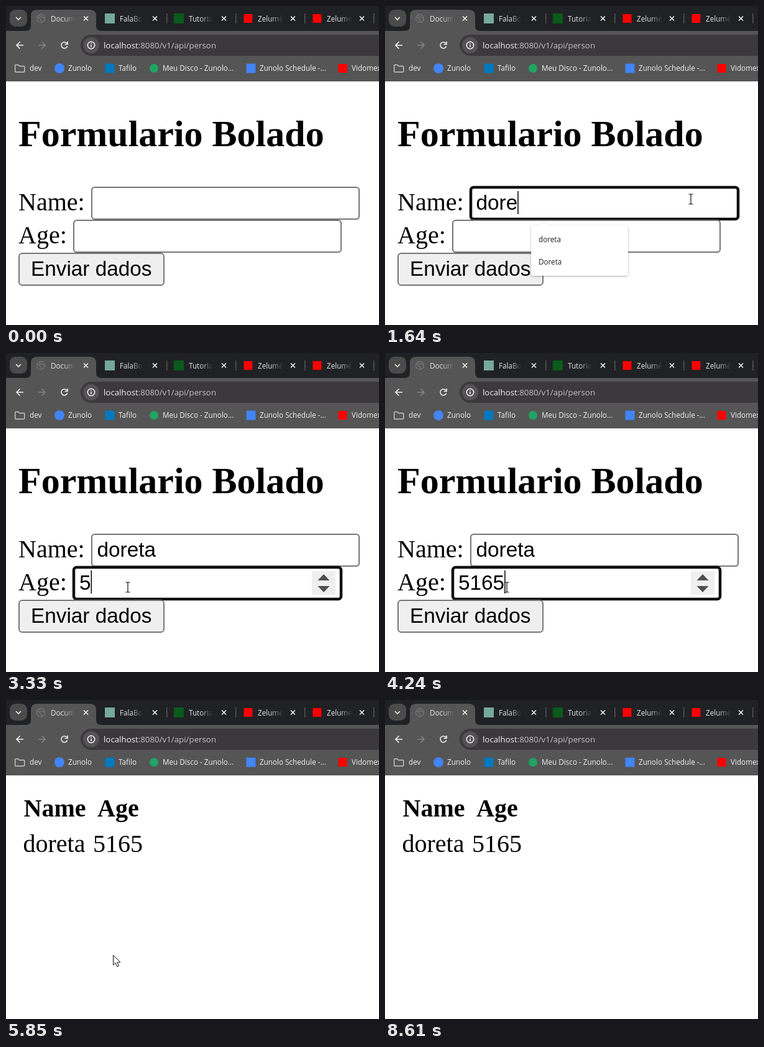
Recreate the animation shown at these times as an HTML page. Size 600 by 512 pixels, loop 8.64 s.

```html
<!DOCTYPE html>
<html lang="pt">
<head>
<meta charset="utf-8">
<title>Formulario</title>
<style>
  html, body { margin: 0; width: 100%; height: 100%; overflow: hidden; background: #fff; }
  svg { display: block; width: 100vw; height: 100vh; }
  text { white-space: pre; }
  .ui { font: 11.7px "Open Sans", "Noto Sans", sans-serif; fill: #f1f1f1; }
  .url { font-size: 13.3px; }
  .serif { font: 40px "Liberation Serif", serif; }
  .bold { font-weight: 700; }
  .sans { font: 33.33px "Liberation Sans", Arial, sans-serif; }
  .line { fill: none; stroke: #f0f0f0; stroke-width: 1.6; }
  .box { fill: #fff; stroke: #767676; stroke-width: 2; }
  .box.hover { stroke: #505050; }
  .box.focus { stroke: #101010; stroke-width: 4.5; }
</style>
</head>
<body>
<svg viewBox="0 0 600 512" preserveAspectRatio="none">
  <defs>
    <linearGradient id="fade">
      <stop offset=".5" stop-color="#e6e6e6"/>
      <stop offset="1" stop-color="#e6e6e6" stop-opacity="0"/>
    </linearGradient>
    <filter id="shadow" x="-10%" y="-15%" width="120%" height="135%">
      <feDropShadow dx="0" dy="1" stdDeviation="1.6" flood-opacity=".35"/>
    </filter>
  </defs>

  <rect width="600" height="512" fill="#fff"/>

  <!-- browser window -->
  <rect width="600" height="41" fill="#202124"/>
  <rect y="40" width="600" height="81" fill="#555"/>
  <path d="M32 40q8 0 8-8V16q0-10 10-10h85q10 0 10 10v16q0 8 8 8z" fill="#555"/>
  <rect x="6" y="6" width="28" height="27" rx="9" fill="#4b4b4c"/>
  <path class="line" d="M16 18l4 4 4-4"/>
  <g id="tabs"></g>
  <path class="line" d="M28 63H17.500M22.500 57.500L17 63l5.500 5.500"/>
  <path class="line" d="M52 63h10.500M57.500 57.500L63 63l-5.500 5.500" style="stroke:#858585"/>
  <path class="line" d="M98 60a5 5 0 1 0 .7 4.500M99 57v4.500h-4.500"/>
  <rect x="120" y="46" width="520" height="34" rx="17" fill="#3b393b"/>
  <circle cx="137" cy="63" r="13" fill="#545254"/>
  <circle class="line" cx="137" cy="63" r="5.700"/>
  <path class="line" d="M137 62v4M137 59.200v1.500"/>
  <text class="ui url" x="157" y="68">localhost<tspan fill="#c4c4c4">:8080/v1/api/person</tspan></text>
  <path class="line" d="M14.700 95.500q0-1 1-1h4l2 2h7q1 0 1 1v7.500q0 1-1 1h-13q-1 0-1-1z" style="stroke:#c8c8c8;stroke-width:1.400"/>
  <g id="marks"></g>

  <!-- form page -->
  <g id="form">
    <text class="serif bold" x="20" y="225" style="font-size:60px">Formulario Bolado</text>
    <text class="serif" x="20" y="328">Name:</text>
    <text class="serif" x="20" y="381">Age:</text>
    <rect id="nameBox" class="box" x="138" y="291" width="430" height="51" rx="4.500"/>
    <rect id="ageBox" class="box" x="109" y="344" width="430" height="51" rx="4.500"/>
    <text id="nameText" class="sans" x="146.500" y="327"></text>
    <text id="ageText" class="sans" x="118" y="380"></text>
    <g id="stepper">
      <rect x="492" y="350" width="38" height="38" fill="#efefef"/>
      <path d="M501.500 365l9.500-10 9.500 10zM501.500 374l9.500 10 9.500-10z" fill="#505050"/>
    </g>
    <rect id="button" x="21" y="397" width="233" height="51" rx="5" fill="#efefef" stroke="#767676" stroke-width="2"/>
    <text class="sans" x="40" y="433">Enviar dados</text>
    <rect id="caret" width="1.500" height="37"/>
    <g id="popup">
      <path d="M239 352h9l8-7 8 7h123q4 0 4 4v73q0 4-4 4H239q-4 0-4-4v-73q0-4 4-4z" fill="#fff" filter="url(#shadow)"/>
      <text class="ui" x="247" y="379" style="fill:#222">doreta</text>
      <text class="ui" x="247" y="415" style="fill:#222">Doreta</text>
    </g>
  </g>

  <!-- result page -->
  <g id="result">
    <text class="serif bold" x="28.500" y="186.500">Name</text>
    <text class="serif bold" x="147" y="186.500">Age</text>
    <text class="serif" x="27.500" y="243.500">doreta</text>
    <text class="serif" x="140" y="243.500">5165</text>
  </g>

  <path id="beam" d="M-3.500-8h2.500l1 1 1-1h2.500M0-7V7M-3.500 8h2.500l1-1 1 1h2.500" fill="none" stroke="#111" stroke-width="1.200"/>
  <path id="arrow" d="M.5.5v16l3.700-3.500 2.600 6 2.700-1.200-2.600-5.800h5z" fill="#fff" stroke="#111"/>
</svg>

<script>
const LOOP = 8640;
const $ = id => document.getElementById(id);
const show = (id, on) => { $(id).style.display = on ? '' : 'none'; };

const dot = (x, y, r, color) => `<circle cx="${x}" cy="${y}" r="${r}" fill="${color}"/>`;
const square = (x, y, s, color) =>
  `<rect x="${x - s / 2}" y="${y - s / 2}" width="${s}" height="${s}" fill="${color}"/>`;
const globe = `<g fill="none" stroke="#747474" stroke-width="1.3"><circle cx="56" cy="20" r="6.500"/>
  <path d="M50 18q4 0 5 3t4 5M54 14q0 4 4 4t4 3"/></g>`;

const tabs = [
  ['Docum', globe],
  ['FalaBo', square(167, 20, 16, '#75a99c')],
  ['Tutoria', square(278, 20, 16, '#0a5a1c')],
  ['Zelumé', square(389.5, 20, 14, '#f00')],
  ['Zelumé', square(500.5, 20, 14, '#f00')],
];
$('tabs').innerHTML = tabs.map(([title, icon], i) => {
  const x = 111 * i;
  const divider = i ? `<rect x="${x + 147}" y="12" width="1.500" height="16" fill="#555"/>` : '';
  return `${icon}${divider}<text class="ui" x="${72 + x}" y="24.500" style="fill:url(#fade)">${title}</text>
    <path class="line" d="M${125 + x} 16.500l7 7m0-7l-7 7"/>`;
}).join('');

const marks = [
  [38, 'dev', ''],
  [100, 'Zunolo', dot(86, 100, 8, '#4285f4')],
  [181, 'Tafilo', square(167, 100, 15, '#0079bf')],
  [252, 'Meu Disco - Zunolo...', dot(238, 100, 7, '#1fa463')],
  [408, 'Zunolo Schedule -...', square(394, 100, 15, '#4285f4')],
  [556, 'Vidomex', square(541.5, 100, 14, '#f00')],
];
$('marks').innerHTML = marks.map(([x, label, icon]) =>
  `${icon}<text class="ui" x="${x}" y="104">${label}</text>`).join('');

const FOCUS_NAME = 500, FOCUS_AGE = 2850, PRESS = 5080, SUBMIT = 5220;
const fields = [
  { box: 'nameBox', text: 'nameText', value: 'doreta', x: 146.5, y: 297,
    from: FOCUS_NAME, to: FOCUS_AGE, keys: [1080, 1230, 1390, 1550, 1900, 2000] },
  { box: 'ageBox', text: 'ageText', value: '5165', x: 118, y: 349,
    from: FOCUS_AGE, to: PRESS, keys: [3330, 3520, 3710, 3900] },
];

// time, x, y
const path = [
  [60, 606, 335], [450, 492, 310], [2080, 492, 310], [2550, 222, 367],
  [2950, 222, 367], [3250, 196, 376], [4330, 196, 376], [4850, 172, 409],
  [5900, 172, 409], [6270, 404, 238], [8080, 404, 238], [8520, 606, 226],
];

function pointerAt(t) {
  const i = path.findIndex(p => p[0] > t);
  if (i < 1) return null;
  const [t0, x0, y0] = path[i - 1], [t1, x1, y1] = path[i];
  const u = (t - t0) / (t1 - t0), k = u * u * (3 - 2 * u);
  return [x0 + (x1 - x0) * k, y0 + (y1 - y0) * k];
}

const inside = (p, x, y, w, h) => !!p && p[0] > x && p[0] < x + w && p[1] > y && p[1] < y + h;

function draw(t) {
  const onForm = t < SUBMIT, pointer = pointerAt(t);
  const overName = onForm && inside(pointer, 137, 290, 432, 53);
  const overAge = onForm && inside(pointer, 108, 343, 432, 53);
  const overButton = onForm && inside(pointer, 20, 396, 235, 53);
  show('form', onForm);
  show('result', !onForm);

  let caret = false;
  for (const f of fields) {
    const active = t >= f.from && t < f.to;
    const typed = f.keys.filter(k => k <= t);
    const hover = f.box === 'nameBox' ? overName : overAge;
    $(f.text).textContent = f.value.slice(0, typed.length);
    $(f.box).setAttribute('class', 'box' + (active ? ' focus' : hover ? ' hover' : ''));
    if (active) {
      const last = typed.length ? typed[typed.length - 1] : f.from;
      caret = (t - last) % 1060 < 530;
      const width = typed.length ? $(f.text).getComputedTextLength() : 0;
      $('caret').setAttribute('x', f.x + width);
      $('caret').setAttribute('y', f.y);
    }
  }
  show('caret', caret);
  show('popup', t >= FOCUS_NAME + 60 && t < FOCUS_AGE);
  show('stepper', overAge || (t >= FOCUS_AGE && t < PRESS));
  $('button').setAttribute('fill', overButton ? (t > PRESS && t < PRESS + 100 ? '#f5f5f5' : '#e5e5e5') : '#efefef');

  const beam = overName || overAge;
  show('beam', pointer && beam);
  show('arrow', pointer && !beam);
  if (pointer) $(beam ? 'beam' : 'arrow').setAttribute('transform', `translate(${pointer})`);
}

function tick() {
  draw(performance.now() % LOOP);
  requestAnimationFrame(tick);
}
tick();
</script>
</body>
</html>
```
